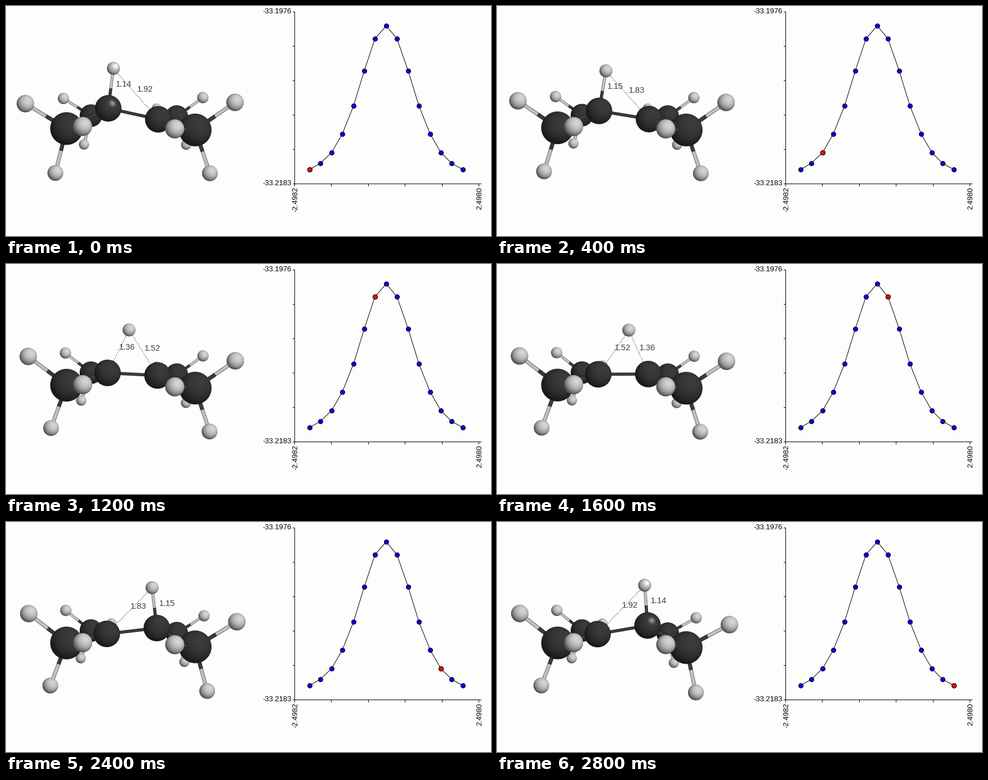
A matplotlib script for the animation above (3000 ms loop, 861 px wide and 408 px high).

```python
import numpy as np
import matplotlib.pyplot as plt
from matplotlib.animation import FuncAnimation

W, H, DPI = 861, 408, 64
PX = 72 / DPI
STEPS, STEP_MS = 15, 200
LAST = STEPS - 1
BG = "#fdfefc"
MOL_W = 440

# Left half of the molecule at rest: radius, x, y, mirror axis, carbon it hangs on.
# The right half is its mirror image, running backwards in time.
HALF = {
    "c_big": (29, 107, 214, 221.2, None),
    "c_back": (20, 150.3, 192, 226.5, None),
    "h_back": (10, 105, 157, 227.3, "c_back"),
    "h_low": (9, 133, 241.5, 225.7, "c_back"),
    "h_hid": (8.5, 187, 179, 227, None),
    "h_far": (15.5, 39, 163, 223, "c_big"),
    "h_foot": (14, 79.5, 290, 219.8, "c_big"),
    "h_front": (17, 135.5, 213, 217.3, "c_big"),
}
TILT = 0.0235
BOND_MAX = 1.31
ANGSTROM = 62.7  # pixels

LIGHT = np.array([0.33, -0.38, 0.86])
LIGHT /= np.linalg.norm(LIGHT)
YY, XX = np.mgrid[0:H, 0:MOL_W].astype(float)


def ch_distance(k):
    """Distance from the moving hydrogen to the left carbon."""
    return np.interp(k, np.arange(0, STEPS, 2),
                     [1.14, 1.15, 1.21, 1.36, 1.52, 1.68, 1.83, 1.92])


def half_pose(k):
    """Left atoms at step k; groups swing about their carbon and settle."""
    decay = np.exp(-k / 3.3)
    swing = 0.12 * decay - 0.02
    out = {}
    for name, (r, x, y, axis, hub) in HALF.items():
        drop = 0
        if name[0] == "c":
            drop = 0.1 * r * decay
        elif hub:
            hx, hy = HALF[hub][1:3]
            x, y = x + swing * (y - hy), y - swing * (x - hx)
            drop = 0.1 * HALF[hub][0] * decay
        out[name] = (x, y + drop, r, axis)
    u = k / LAST
    out["c"] = (181 - 3 * u, 198.3 - 17.3 * (1 - u) ** 2, 23.5, 223.9)
    return out


def meet(a, b, ra, rb):
    """Upper crossing of the circles around a and b."""
    a, b = np.array(a[:2]), np.array(b[:2])
    d = np.linalg.norm(b - a)
    u = (b - a) / d
    t = (ra ** 2 - rb ** 2 + d ** 2) / (2 * d)
    return a + t * u + np.sqrt(ra ** 2 - t ** 2) * np.array([u[1], -u[0]])


def pose(k):
    """Centre and radius of every atom at step k."""
    p = {n + "_l": a[:3] for n, a in half_pose(k).items()}
    for n, (x, y, r, axis) in half_pose(LAST - k).items():
        p[n + "_r"] = (2 * axis - x, y + TILT * 2 * (axis - x), r)
    x, y = meet(p["c_l"], p["c_r"], ANGSTROM * ch_distance(k),
                ANGSTROM * ch_distance(LAST - k))
    p["h"] = (x, y, 11.5)
    return p


def blend(buf, mask, value):
    buf += mask[..., None] * (value[..., None] - buf)


def sphere(buf, x, y, r, carbon, shiny):
    dx, dy = (XX - x) / r, (YY - y) / r
    d = np.hypot(dx, dy)
    nz = np.sqrt(np.clip(1 - d * d, 0, 1))
    lit = np.clip(dx * LIGHT[0] + dy * LIGHT[1] + nz * LIGHT[2], 0, 1)
    value = 26 + 34 * lit if carbon else 85 + 128 * lit
    if shiny:
        value = value + (95 * lit ** 40 if carbon else 42 * lit ** 12)
    blend(buf, np.clip(r * (1 - d) + 0.5, 0, 1), value / 255)


def bond(buf, a, b, width, light_start, start=0.0):
    vx, vy = b[0] - a[0], b[1] - a[1]
    length = np.hypot(vx, vy)
    t = ((XX - a[0]) * vx + (YY - a[1]) * vy) / length ** 2
    off = np.abs((XX - a[0]) * vy - (YY - a[1]) * vx) / length
    mask = np.clip(width / 2 + 0.5 - off, 0, 1) * ((t >= start) & (t <= 1))
    base = np.where((t < 0.5) & light_start, 200, 62)
    blend(buf, mask, base * (1 - 0.45 * np.clip(2 * off / width, 0, 1) ** 2) / 255)


def render(p, bonded, shiny):
    """Paint the molecule from back to front."""
    buf = np.empty((H, MOL_W, 3))
    buf[:] = np.array([253, 254, 252]) / 255

    def balls(*names):
        for n in names:
            sphere(buf, *p[n], n[0] == "c", n in shiny)

    def stick(a, b, width, start=0.0):
        bond(buf, p[a], p[b], width, a[0] == "h" and not start, start)

    for s in ("_l", "_r"):
        stick("h_back" + s, "c_back" + s, 5)
        stick("h_low" + s, "c_back" + s, 6)
        balls("h_back" + s, "h_hid" + s, "h_low" + s, "c_back" + s)
    stick("c_l", "c_r", 5.5)
    for c in bonded:
        stick("h", c, 5.5)
    for s in ("_l", "_r"):
        stick("c" + s, "c_big" + s, 8)
        stick("h_far" + s, "c_big" + s, 7)
        stick("h_foot" + s, "c_big" + s, 7)
        balls("c" + s, "c_big" + s, "h_far" + s, "h_foot" + s)
        stick("c_big" + s, "h_front" + s, 6, 0.4)
        balls("h_front" + s)
    balls("h")
    return np.clip(buf, 0, 1)


def dotted(a, b):
    """Dots every three pixels between the two sphere surfaces."""
    p, q = np.array(a[:2]), np.array(b[:2])
    d = np.linalg.norm(q - p)
    t = np.arange(a[2] + 1, d - b[2], 3)
    return (p + np.outer(t, (q - p) / d)).T


fig = plt.figure(figsize=(W / DPI, H / DPI), dpi=DPI, facecolor=BG)
ax = fig.add_axes([0, 0, 1, 1])
ax.axis("off")
mol = ax.imshow(np.ones((H, MOL_W, 3)), extent=(0, MOL_W, H - 1, -1),
                interpolation="nearest", aspect="auto")
# limits chosen so that whole numbers snap to pixel centres
ax.set_xlim(0, W)
ax.set_ylim(H - 1, -1)


def line(xs, ys, **kw):
    return ax.plot(xs, ys, color="black", lw=PX, **kw)[0]


def label(x, y, s, size=13, **kw):
    return ax.text(x, y, s, family="Liberation Sans", fontsize=size * PX, **kw)


# axes of the energy plot
line([512, 512], [9, 314])
line([512, 843], [314, 314])
for i in range(6):
    line([509, 512], [9 + 61 * i] * 2)
    line([round(512 + 65.4 * i)] * 2, [314, 318])
for y, s in ((9, "-33.1976"), (314, "-33.2183")):
    label(507, y - 1.5, s, ha="right", va="center_baseline")
for x, s in ((512, "-2.4982"), (839, "2.4980")):
    label(x + 2, 320, s, rotation=90, ha="center", va="top")

# energy curve: a bell around the middle step
step = np.arange(STEPS)
px = np.round(538.8 + 19.43 * step)
py = np.round(34 + 265 * (1 - np.cosh(0.249 * (step - LAST / 2)) ** -3))
line(px, py, zorder=3)
dot = dict(marker="o", ls="none", ms=8 * PX, mec="black", mew=PX)
ax.plot(px, py, mfc="#0000ee", zorder=4, **dot)
red, = ax.plot([], [], mfc="#ff0000", zorder=5, **dot)

CARBONS = ("c_l", "c_r")
dots = {c: ax.plot([], [], ",", color="black")[0] for c in CARBONS}
tags = {c: label(0, 0, "", 14.5, color="#3c3c3c", va="center_baseline", zorder=6)
        for c in CARBONS}


def update(k):
    p = pose(k)
    dist = dict(zip(CARBONS, (ch_distance(k), ch_distance(LAST - k))))
    bonded = [c for c in CARBONS if dist[c] < BOND_MAX]
    shiny = bonded + ["h"] if k in (0, LAST) else []
    mol.set_data(render(p, bonded, shiny))
    for c in CARBONS:
        joined = c in bonded
        dots[c].set_data(*(([], []) if joined else dotted(p["h"], p[c])))
        tags[c].set_text(f"{dist[c]:.2f}")
        tags[c].set_position(((p["h"][0] + p[c][0]) / 2 + (9 if joined else 2.5),
                              (p["h"][1] + p[c][1]) / 2 - 9.5))
    red.set_data([px[k]], [py[k]])
    return [mol, red, *dots.values(), *tags.values()]


anim = FuncAnimation(fig, update, frames=STEPS, interval=STEP_MS,
                     init_func=lambda: update(0), repeat=True, repeat_delay=0)
plt.show()
```
